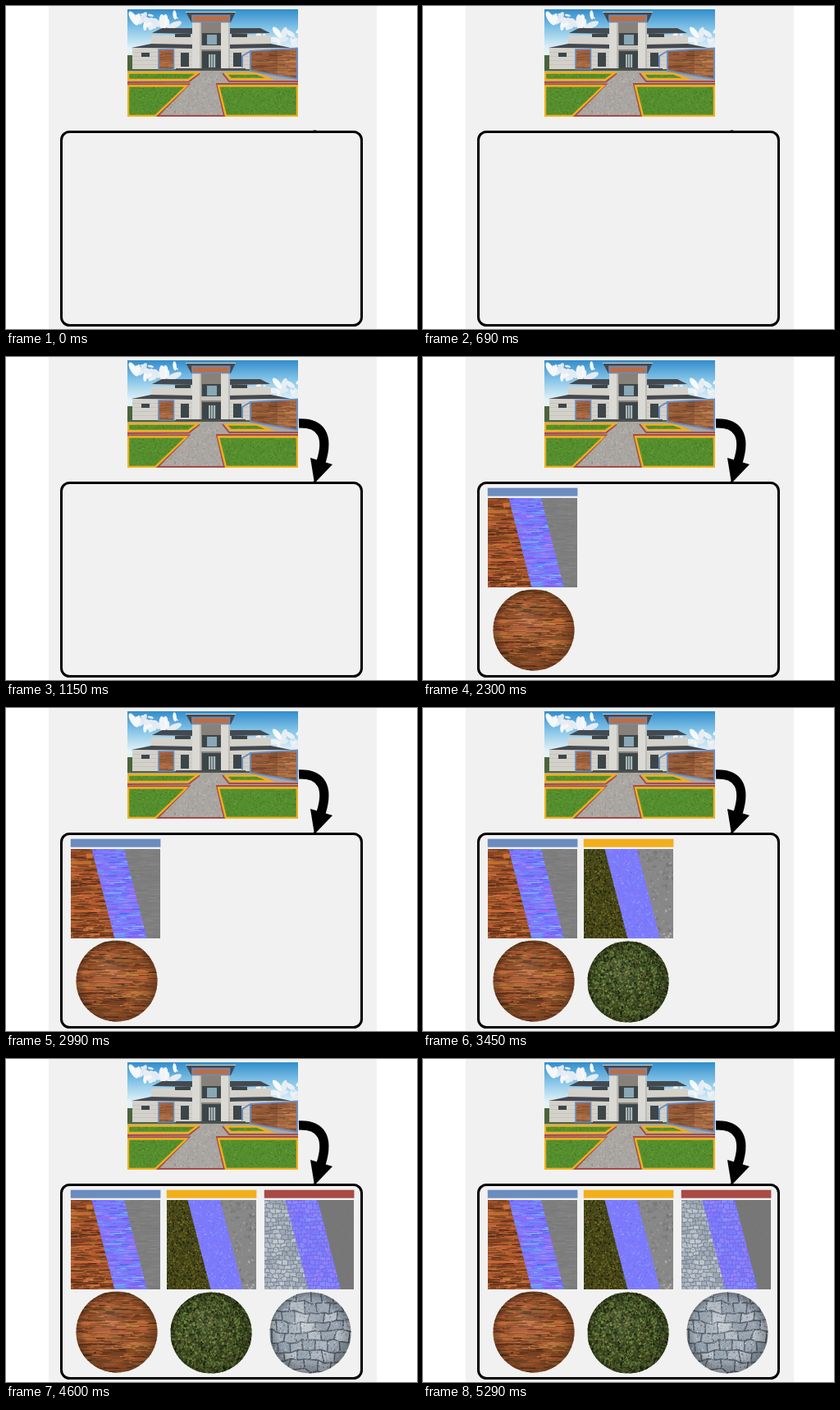
Animation of 501x394 px, one loop 5.75 s. Source, as an HTML page with a canvas:

```html
<!DOCTYPE html>
<html lang="en">
<head>
<meta charset="utf-8">
<title>Materials from a house picture</title>
<style>
html, body { margin: 0; width: 100%; height: 100%; overflow: hidden; background: #fff; }
canvas { position: absolute; left: 0; top: 0; width: 501px; height: 394px; }
</style>
</head>
<body>
<script>
const W = 501, H = 394, STEP = 1150;
const BLUE = '#6a8cbf', YELLOW = '#f1af1c', RED = '#a84a45';

let seed = 7;
const rnd = () => (seed = seed * 16807 % 2147483647) / 2147483647;
const span = (a, b) => a + (b - a) * rnd();
const pick = list => list[Math.floor(rnd() * list.length)];
const tone = (h, s, l, vary) => `hsl(${h + span(-6, 6)} ${s}% ${l + span(-vary, vary)}%)`;

function layer(draw) {
  const el = document.createElement('canvas');
  const k = window.devicePixelRatio || 1;
  el.width = W * k;
  el.height = H * k;
  const c = el.getContext('2d');
  c.scale(k, k);
  draw(c);
  document.body.append(el);
  return el;
}

function shape(...pts) {
  const p = new Path2D();
  for (let i = 0; i < pts.length; i += 2) p.lineTo(pts[i], pts[i + 1]);
  return p;
}
function closed(...pts) {
  const p = shape(...pts);
  p.closePath();
  return p;
}
function fill(c, color, path) {
  c.fillStyle = color;
  c.fill(path);
}
function stroke(c, color, width, path) {
  c.strokeStyle = color;
  c.lineWidth = width;
  c.stroke(path);
}
function rect(c, color, x, y, w, h) {
  c.fillStyle = color;
  c.fillRect(x, y, w, h);
}
function clipped(c, path, draw) {
  c.save();
  c.clip(path);
  draw();
  c.restore();
}

// Textures: each fills a box with seeded detail, colours come from a function
function specks(c, [x, y, w, h], count, color, max, flat = .7) {
  for (let i = 0; i < count; i++) {
    const r = span(.3, 1) * max, dot = new Path2D();
    dot.ellipse(x + rnd() * w, y + rnd() * h, r, r * flat, rnd() * 3, 0, 7);
    fill(c, color(), dot);
  }
}

function streaks(c, [x, y, w, h], count, color, length) {
  for (let i = 0; i < count; i++) {
    const len = span(.2, 1) * length;
    rect(c, color(), x - len / 2 + rnd() * w, y + rnd() * h, len, span(.4, 1.2));
  }
}

function planks(c, box, size, color, grain) {
  const [x, y, w, h] = box;
  for (let py = y; py < y + h; py += size)
    for (let px = x - rnd() * 40, len; px < x + w; px += len) {
      len = span(5, 12) * size;
      rect(c, color(), px, py, len + .5, size + .5);
    }
  streaks(c, box, w * h / 12, grain, 22);
}

// Bricks share jittered corners, so the stones stay tightly packed
function bricks(c, [x, y, w, h], size, color, joint, width) {
  const wobble = n => (Math.sin(n * 12.9898) * 43758.5 % 1) * size * .2;
  const corner = (i, r) => [
    x + i * size / 2 + wobble(i + r * 57),
    y + r * size * .75 + wobble(i * 31 + r * 17 + 5)
  ];
  for (let r = -1; r < h / size * 1.4 + 1; r++)
    for (let i = -2 + (r & 1); i < w / size * 2 + 1; i += 2) {
      const top = [0, 1, 2].flatMap(n => corner(i + n, r));
      const bottom = [2, 1, 0].flatMap(n => corner(i + n, r + 1));
      const stone = closed(...top, ...bottom);
      fill(c, color(), stone);
      stroke(c, joint, width, stone);
    }
}

const wood = () => tone(22, 58, 40, 13);
const grain = () => tone(21, 58, 36, 20);
const soil = () => tone(pick([48, 58, 70]), 52, 20, 13);
const moss = () => tone(pick([65, 80, 90]), 36, 25, 17);
const stone = () => tone(211, 14, 71, 8);
const grit = () => tone(211, 13, 66, 22);
const normal = () => tone(pick([225, 240, 240, 252]), 92, 73, 5);
const ridge = () => tone(pick([213, 238, 264]), 85, 69, 8);
const gray = () => tone(0, 0, 50, 4);
const pale = () => tone(0, 0, 59, 11);

const kinds = [
  {
    x: 79, color: BLUE, ball: [135, 333], light: .08,
    albedo: (c, b) => planks(c, b, 5.6, wood, grain),
    normal(c, b) {
      rect(c, '#7b78fb', ...b);
      streaks(c, b, 900, ridge, 20);
    },
    rough(c, b) {
      rect(c, '#7e7e7e', ...b);
      streaks(c, b, 650, gray, 20);
    },
    skin: (c, b) => planks(c, b, 8.8, () => tone(26, 52, 43, 13), grain)
  },
  {
    x: 196, color: YELLOW, ball: [250, 334], light: .06,
    albedo(c, b) {
      rect(c, '#44451b', ...b);
      specks(c, b, 5200, soil, 1.3);
    },
    normal(c, b) {
      rect(c, '#7c7afb', ...b);
      specks(c, b, 1900, normal, 1.2);
    },
    rough(c, b) {
      rect(c, '#888', ...b);
      specks(c, b, 300, gray, 3);
      specks(c, b, 260, pale, 2);
    },
    skin(c, b) {
      rect(c, '#3c481f', ...b);
      specks(c, b, 4200, moss, 1.9);
    }
  },
  {
    x: 315, color: RED, ball: [371, 334], light: .18,
    albedo(c, b) {
      bricks(c, b, 7, stone, '#75818d', .8);
      specks(c, b, 1500, grit, .8);
    },
    normal(c, b) {
      bricks(c, b, 7, () => tone(241, 94, 74, 2), '#7566e8', .8);
      specks(c, b, 1200, normal, .9);
    },
    rough(c, b) {
      rect(c, '#777', ...b);
      specks(c, b, 350, () => tone(0, 0, 46, 3), .9);
    },
    skin(c, b) {
      bricks(c, b, 16, stone, '#56616c', 1.5);
      specks(c, b, 1600, grit, 1.1);
    }
  }
];

function material(c, kind) {
  const { x, color, ball: [bx, by], light } = kind;
  const size = 109, y = 172, R = 49.5;
  const box = [x, y, size, size];
  rect(c, color, x - .2, 159.7, size + .6, 10);
  const panel = new Path2D();
  panel.rect(...box);
  clipped(c, panel, () => {
    kind.albedo(c, box);
    const from = (edge, draw) => clipped(c,
      closed(x + edge, y, x + size, y, x + size, y + size, x + edge + 28, y + size),
      () => draw(c, box));
    from(25.5, kind.normal);
    from(65, kind.rough);
  });

  const ball = new Path2D();
  ball.arc(bx, by, R, 0, 7);
  clipped(c, ball, () => {
    const area = [bx - R, by - R, 2 * R, 2 * R];
    kind.skin(c, area);
    const g = c.createRadialGradient(bx - 10, by - 16, 6, bx, by, R);
    g.addColorStop(0, `rgba(255,255,255,${light})`);
    g.addColorStop(.7, 'rgba(0,0,0,.02)');
    g.addColorStop(1, 'rgba(0,0,0,.3)');
    rect(c, g, ...area);
  });
}

// House
const WALL = '#d3d1ca', ROOF = '#444950', GLASS = '#3c4649';

function sky(c) {
  const g = c.createLinearGradient(0, 4, 0, 52);
  g.addColorStop(0, '#318dcc');
  g.addColorStop(.5, '#86c5e8');
  g.addColorStop(1, '#e3f2f8');
  rect(c, g, 148, 4, 208, 80);
  for (const [x, y] of [[182, 16], [335, 36]])
    specks(c, [x - 30, y - 7, 60, 16], 20, () => tone(205, 35, 94, 4), 10, .4);
}

function siding(c, path, box) {
  clipped(c, path, () => planks(c, box, 3, () => tone(23, 45, 46, 7), () => tone(23, 43, 43, 11)));
}

function wing(c) {
  rect(c, WALL, 177, 36, 52, 13);
  rect(c, WALL, 154, 51, 75, 26);
  for (let y = 56; y < 76; y += 5) rect(c, '#bdbdb8', 154, y, 75, .6);
  fill(c, ROOF, closed(178, 33, 190, 27, 229, 27, 229, 34));
  fill(c, ROOF, closed(153, 51, 177, 46, 229, 47, 229, 52));
  stroke(c, '#d9d3c9', 1, shape(153, 51.5, 229, 52.5));
  rect(c, GLASS, 206, 34, 19, 4);
  rect(c, GLASS, 165, 57, 10, 5);
  rect(c, GLASS, 213, 57, 10, 17);
}

function tower(c) {
  rect(c, '#87817a', 236, 20, 28, 57);
  rect(c, GLASS, 239, 33, 23, 15);
  rect(c, '#8aa7b6', 245, 35, 12, 12);
  rect(c, '#c4c3bd', 238, 48, 25, 5);
  rect(c, GLASS, 239, 55, 23, 22);
  for (let i = 0; i < 3; i++) rect(c, '#a9b6b8', 247 + i * 3, 59, 2.2, 16);
  for (const x of [227, 262]) {
    rect(c, '#dbd9d3', x, 19, 11, 58);
    rect(c, '#bdbcb6', x + 9, 19, 2, 58);
  }
  fill(c, ROOF, closed(219, 7, 280, 7, 274, 20, 226, 20));
  stroke(c, '#d9d3c9', 1, shape(219, 7.5, 280, 7.5));
  rect(c, '#b96f46', 227, 12, 46, 7);
  c.lineWidth = 1.6;
  c.strokeStyle = BLUE;
  c.strokeRect(227, 11.5, 45.5, 8);
}

function house(c) {
  wing(c);
  c.save();
  c.translate(500, 0);
  c.scale(-1, 1);
  wing(c);
  c.restore();

  const panel = closed(186, 53, 204.5, 53, 204.5, 77, 186, 77);
  siding(c, panel, [186, 53, 19, 24]);
  stroke(c, BLUE, 1.6, panel);
  tower(c);
  rect(c, '#4b5051', 207, 76, 85, 2.5);

  const wall = closed(298, 55, 355, 51.5, 355, 89, 298, 79);
  siding(c, wall, [298, 51, 58, 39]);
  fill(c, 'rgba(55,25,12,.2)', closed(298, 55, 331, 53, 331, 85, 298, 79));
  stroke(c, BLUE, 2, wall);
  stroke(c, BLUE, 2, shape(288, 75, 288, 61, 298, 55));
}

function lawn(c, top, bottom, left, right, left2, right2) {
  const path = closed(left, top, right, top, right2, bottom, left2, bottom);
  const box = [left, top, Math.max(right, right2) - left, bottom - top];
  clipped(c, path, () => {
    rect(c, '#558f2e', ...box);
    specks(c, box, box[2] * box[3] / 3, () => tone(95, 50, 36, 8), 1);
  });
  stroke(c, YELLOW, 2.4, path);
}

function garden(c) {
  rect(c, '#4c643b', 148, 60, 208, 24);
  rect(c, '#aaa6a2', 148, 79, 208, 56);
  specks(c, [183, 80, 85, 55], 900, () => tone(25, 4, 65, 12), 1.5, .35);
  stroke(c, RED, 2, shape(148, 93, 223, 92.5, 236, 82));
  stroke(c, RED, 2, shape(148, 95.5, 223, 95.5, 185, 134, 266, 134, 257, 95, 356, 95));
  stroke(c, RED, 2, shape(264, 82, 272, 92, 356, 92));
  lawn(c, 81.5, 90, 149, 234, 149, 222);
  lawn(c, 82.5, 89, 268, 305, 274, 322);
  lawn(c, 97.5, 134, 149, 220, 149, 182);
  lawn(c, 97.5, 134, 259, 355, 268, 355);
}

function stage(c) {
  rect(c, '#f1f1f1', 52, 0, 400, H);
  const photo = new Path2D();
  photo.rect(148, 4, 208, 131);
  clipped(c, photo, () => [sky, garden, house].forEach(draw => draw(c)));
  const frame = new Path2D();
  frame.roundRect(67.5, 153.5, 366, 236, 10);
  stroke(c, '#000', 3, frame);
  fill(c, '#000', closed(374.5, 151.5, 378.5, 151.5, 376, 154));
}

function arrow(c) {
  stroke(c, '#000', 11.3, new Path2D('M357 81C384 80 394 96 384 128'));
  fill(c, '#000', closed(371, 123, 398, 131, 376, 154));
}

const layers = [stage, arrow, ...kinds.map(kind => c => material(c, kind))].map(layer);

const start = performance.now();
function show(now) {
  const step = Math.floor(Math.max(0, now - start) / STEP) % layers.length;
  layers.forEach((el, i) => { el.style.visibility = i <= step ? 'visible' : 'hidden'; });
  requestAnimationFrame(show);
}
show(start);
</script>
</body>
</html>
```
